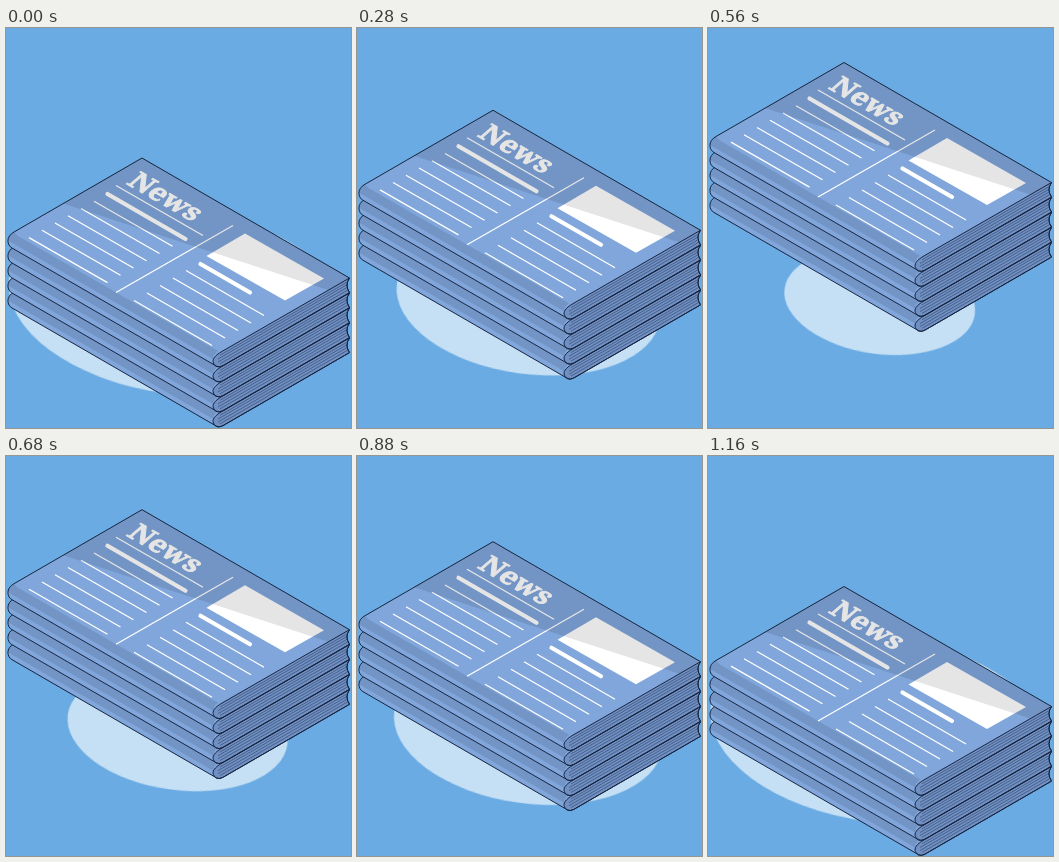
Animation of 345 by 400 pixels, one loop 1.2 s. Source, as an HTML page:

```html
<!DOCTYPE html>
<html lang="en">
<head>
<meta charset="utf-8">
<title>Newspaper stack</title>
<style>
  html, body { margin: 0; width: 100%; height: 100%; overflow: hidden; background: #6aabe3; }
  svg { display: block; width: 345px; height: 400px; }

  .stack { animation: float 1200ms infinite; }
  .shadow {
    fill: #c5dff4;
    transform-origin: 172px 273.5px;
    animation: spread 1200ms infinite;
  }

  .paper { fill: #80a6db; }
  .side { fill: #7090c4; }
  .edge { fill: none; stroke: #17243f; stroke-width: 1; stroke-linejoin: round; }
  .leaf { fill: none; stroke: #17243f; stroke-width: .6; opacity: .75; }
  .shade { fill: #000; opacity: .1; }
  .rule { fill: none; stroke: #fff; stroke-width: 1.3; }
  .bar { stroke: #fff; stroke-width: 4.2; stroke-linecap: round; }
  .white { fill: #fff; }
  text { font: bold 28.5px "Noto Serif", serif; fill: #fff; stroke: #fff; stroke-width: .9; }

  /* 25 pictures a second: 14 steps up, 15 steps down */
  @keyframes float {
    0% { transform: translateY(130px); animation-timing-function: steps(14); }
    46.6666% { transform: translateY(34.5px); animation-timing-function: steps(15); }
    96.6666% { transform: translateY(130.5px); animation-timing-function: steps(1); }
    100% { transform: translateY(130px); }
  }
  @keyframes spread {
    0% { transform: scale(1.768); animation-timing-function: steps(14); }
    46.6666% { transform: scale(1); animation-timing-function: steps(15); }
    96.6666% { transform: scale(1.772); animation-timing-function: steps(1); }
    100% { transform: scale(1.768); }
  }
</style>
</head>
<body>
<svg viewBox="0 0 345 400">
  <defs>
    <path id="body" d="M136 0L343.5 120Q338.5 127 343.5 134.6L217 207.6Q213 209.8 210.5 208.2L6 90C1 87.4 -.5 78.5 8 74Z"/>
    <path id="side" d="M343.5 120L216 193.4C208 198 206 202 207.5 205C209 209.2 213 209.8 217 207.6L343.5 134.6Q338.5 127 343.5 120Z"/>
    <g id="sheet">
      <use href="#body" class="paper"/>
      <path class="shade" d="M8 74L12 78L212 193Q207 197 207 201L2 82.5Q3 77 8 74Z"/>
      <use href="#side" class="side"/>
      <path class="leaf" d="M342 123.6L214 197.3M341.2 126.6L212 201M341.2 129.4L212 204M342 131.9L214 205.8"/>
      <use href="#side" class="edge"/>
      <use href="#body" class="edge"/>
    </g>
  </defs>

  <g class="shadow">
    <ellipse cx="171.7" cy="273.5" rx="96" ry="52.4" transform="rotate(7.7 172 273.5)"/>
  </g>

  <g class="stack">
    <use href="#sheet" y="60"/>
    <use href="#sheet" y="45"/>
    <use href="#sheet" y="30"/>
    <use href="#sheet" y="15"/>
    <use href="#sheet"/>

    <text transform="matrix(.866 .5 -.72 .62 119.5 25.5)">News</text>
    <path class="rule" d="M110 27.5l87 50M110 134.5L227 67.5"/>
    <path class="rule" d="M88 43.3l78.5 45M75 50.5l78.5 45M62 57.8l78.5 45M49 65l78.5 45M36 72.3l78.5 45M23 79.6l78.5 45"/>
    <path class="rule" d="M180 112.5l78 45M167 120l78 45M154 127.5l78 45M141 135l78 45M128 142.5l78 45"/>
    <path class="bar" d="M101.5 36l78 45M194.5 106l49.5 28.5"/>
    <path class="white" d="M239 75.5L318 120.5L279 142.5L200.5 98Z"/>
    <path class="shade" d="M136 0L343.5 120L322 132L57 45.5Z"/>
  </g>
</svg>
</body>
</html>
```
